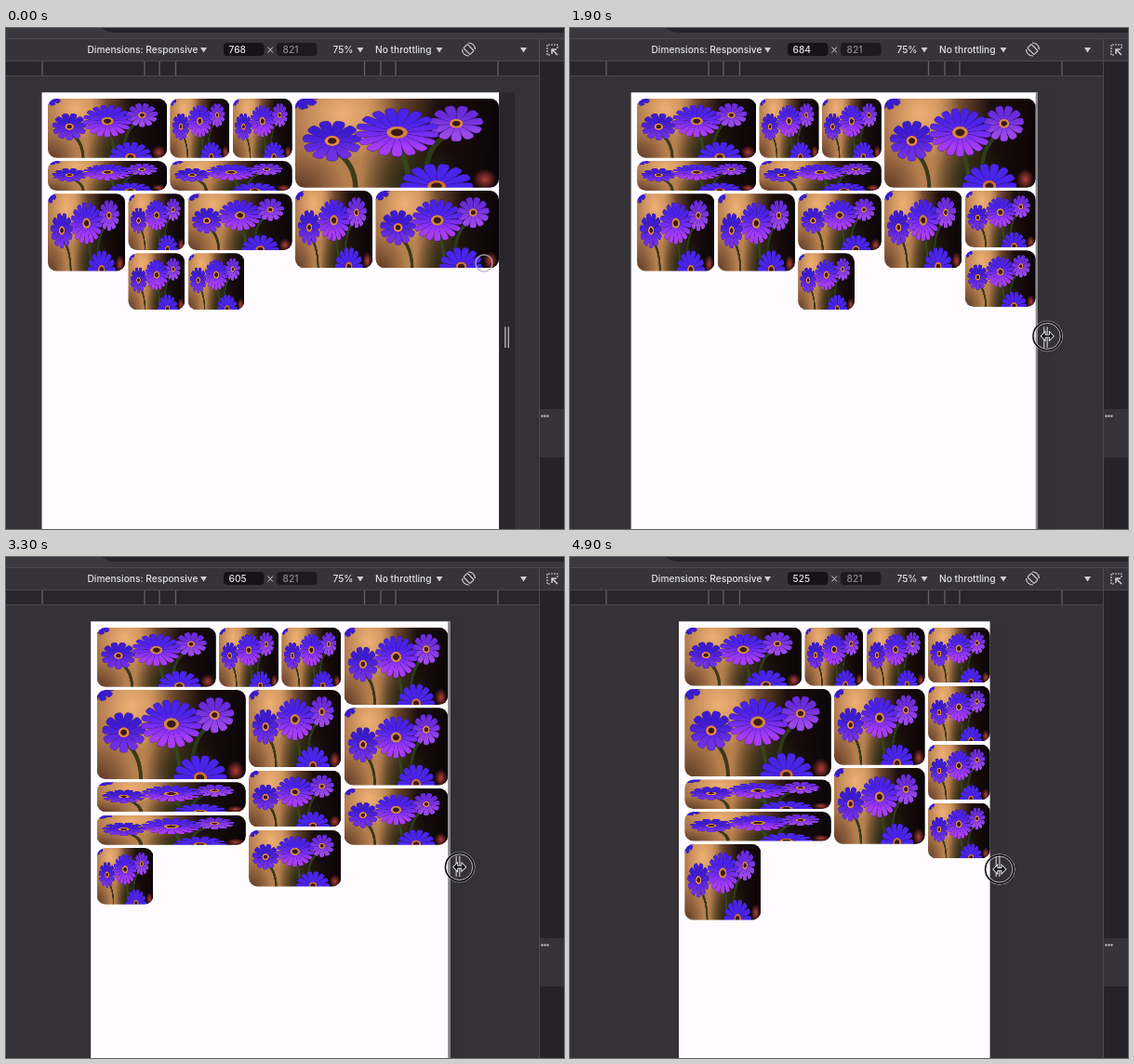
Write an HTML page with a canvas that moves like this. It is 600x539 px and loops after 5 s.

```html
<!DOCTYPE html>
<html lang="en">
<head>
<meta charset="utf-8">
<title>Responsive gallery</title>
<style>
  html, body { margin: 0; width: 100%; height: 100%; overflow: hidden; background: #343236; }
  canvas, svg { position: absolute; left: 0; top: 0; }
  text { font: 500 10.2px Inter, sans-serif; fill: #e4e2e6; }
</style>
</head>
<body>
<canvas id="stage" width="600" height="539"></canvas>
<svg width="600" height="539">
  <defs><path id="arrow" d="M0 21h7l-3.500 5.500z" fill="#cfcdd1"/></defs>
  <path d="M0 0H600V11H0z" fill="#3b393d"/>
  <path d="M103 0Q108 5 118 5H600V0z" fill="#262428"/>
  <path d="M0 11H600V35H0z" fill="#363438"/>
  <path d="M0 35H573V52H0z" fill="#28262a"/>
  <path d="M574 35H600V539H574z" fill="#252327"/>
  <path d="M574 410H600V462H574z" fill="#363438"/>
  <path d="M0 11.5H600M0 35.5H600M0 51.5H573M573.5 11V539" stroke="#4b494e"/>
  <path d="M39 36v15M149 36v15M165 36v15M182.500 36v15M385.500 36v15M403 36v15M419 36v15M529 36v15" stroke="#646267" stroke-width="1.3"/>
  <rect x="234" y="16" width="43.500" height="14" rx="4" fill="#151316"/>
  <rect x="291" y="16" width="43.500" height="14" rx="4" fill="#1c1a1d"/>
  <text x="87.500" y="27">Dimensions: Responsive</text>
  <text x="239.500" y="27" id="width">768</text>
  <path d="M281.500 20.500l5.500 6M287 20.500l-5.500 6" stroke="#d0ced2"/>
  <text x="297.500" y="27" style="fill:#8c8a8f">821</text>
  <text x="351.500" y="27">75%</text>
  <text x="397" y="27">No throttling</text>
  <use href="#arrow" x="209"/><use href="#arrow" x="377.500"/><use href="#arrow" x="462.500"/><use href="#arrow" x="553"/>
  <g fill="none" stroke="#cfcdd1" stroke-width="1.2">
    <rect x="494.500" y="18" width="6" height="10" rx="1" transform="rotate(-45 497.500 23)"/>
    <path d="M497 16a7 7 0 0 1 7.500 7M498 30a7 7 0 0 1-7.500-7"/>
    <path d="M593 22V18H582V29H586" stroke-dasharray="2 1"/>
    <path d="M593 29L587 23M587 28V23H592" stroke-width="1.500"/>
  </g>
  <path d="M575.500 417.500h8" stroke="#cfcdd1" stroke-width="2" stroke-dasharray="2 1"/>
</svg>
<script>
const LOOP = 5000, STEP = 100;
const CENTER = 284.3, TOP = 69.3, ZOOM = 0.641;
const PAD = 10, GAP = 5, MIN_LAYOUT = 531;
const ctx = document.getElementById('stage').getContext('2d');
const widthLabel = document.getElementById('width');

// [time, viewport width]
const drag = [[0, 768], [900, 768], [1400, 702], [2000, 680], [2300, 654], [3300, 605], [3900, 580], [4900, 525]];

// [width, height, count] in order of placement
const tileSizes = [[200, 100, 1], [100, 100, 2], [250, 150, 1], [200, 50, 2], [130, 130, 3], [95, 95, 4]]
  .flatMap(([w, h, count]) => Array(count).fill({ w, h }));

function track(keys, t) {
  const i = keys.findIndex(key => key[0] > t);
  if (i < 0) return keys[keys.length - 1][1];
  const [t0, a] = keys[i - 1], [t1, b] = keys[i];
  return a + (b - a) * (t - t0) / (t1 - t0);
}

// Skyline packing: the first tile that fits goes into the highest free slot,
// and widens to fill it when nothing else fits beside it.
function pack(layoutWidth) {
  const pool = [...tileSizes], placed = [];
  let slots = [{ x: PAD, y: PAD, w: layoutWidth - PAD }];
  while (pool.length) {
    const slot = slots.reduce((best, s) => s.y < best.y ? s : best);
    const pick = pool.findIndex(tile => tile.w <= slot.w);
    if (pick < 0) break;
    let [{ w, h }] = pool.splice(pick, 1);
    const rest = slot.w - w - GAP;
    const wide = pool.length && !pool.some(tile => tile.w <= rest);
    if (wide) w = slot.w;
    placed.push({ x: slot.x, y: slot.y, w, h });
    const next = [{ x: slot.x, y: slot.y + h + GAP, w }];
    if (!wide) next.push({ x: slot.x + w + GAP, y: slot.y, w: rest });
    slots.splice(slots.indexOf(slot), 1, ...next);
    slots = slots.reduce((merged, s) => {
      const last = merged[merged.length - 1];
      if (last && last.y === s.y) last.w += GAP + s.w;
      else merged.push(s);
      return merged;
    }, []);
  }
  return placed;
}

function flower(g, x, y, rx, ry, count, upper, lower, heart) {
  const shade = g.createLinearGradient(0, y - ry, 0, y + ry);
  shade.addColorStop(0.3, upper);
  shade.addColorStop(0.8, lower);
  g.fillStyle = shade;
  g.strokeStyle = '#2a0c7890';
  g.lineWidth = 1;
  for (let i = 0; i < count; i++) {
    const angle = (i * 2 + 1) * Math.PI / count;
    const tip = (reach, turn) => [x + rx * reach * Math.sin(angle + turn), y - ry * reach * Math.cos(angle + turn)];
    const spread = 3.6 / count;
    g.beginPath();
    g.moveTo(x, y);
    g.bezierCurveTo(...tip(0.9, -spread), ...tip(1.05, -spread * 0.7), ...tip(1, 0));
    g.bezierCurveTo(...tip(1.05, spread * 0.7), ...tip(0.9, spread), x, y);
    g.fill();
    g.stroke();
  }
  for (const [r, color] of [[0.25, heart], [0.15, '#3a1a18']]) {
    g.beginPath();
    g.ellipse(x, y, rx * r, ry * r, 0, 0, 7);
    g.fillStyle = color;
    g.fill();
  }
}

function paintPhoto() {
  const photo = document.createElement('canvas');
  photo.width = 320;
  photo.height = 160;
  const g = photo.getContext('2d');
  const glow = (x, y, r, color) => {
    const fill = g.createRadialGradient(x, y, 0, x, y, r);
    fill.addColorStop(0, color);
    fill.addColorStop(1, color + '00');
    g.fillStyle = fill;
    g.fillRect(0, 0, 320, 160);
  };
  const stem = (color, x0, y0, x1, y1) => {
    g.strokeStyle = color;
    g.lineWidth = 8;
    g.beginPath();
    g.moveTo(x0, y0);
    g.quadraticCurveTo(x1, y0 + 20, x1, y1);
    g.stroke();
  };
  const back = g.createLinearGradient(0, 0, 320, 30);
  [[0, '#a8734a'], [0.35, '#b8824f'], [0.53, '#63402a'], [0.7, '#1c0f0c'], [1, '#0c0507']]
    .forEach(stop => back.addColorStop(...stop));
  g.fillStyle = back;
  g.fillRect(0, 0, 320, 160);
  glow(75, 28, 85, '#efb074');
  glow(5, 165, 75, '#5c3824');
  glow(185, 150, 80, '#222a10');
  stem('#3c3a1a', 62, 95, 95, 165);
  stem('#35461a', 165, 95, 178, 165);
  stem('#2c3a18', 240, 65, 205, 140);
  glow(298, 145, 19, '#b04038');
  flower(g, 4, -4, 34, 24, 10, '#3a1cd0', '#3a1cd0', '#3a1cd0');
  flower(g, 253, 45, 42, 32, 11, '#6a2cd8', '#9a48e8', '#e08840');
  flower(g, 58, 76, 46, 36, 11, '#3c1cd0', '#7030e4', '#f08c38');
  flower(g, 222, 157, 57, 40, 14, '#4a24e8', '#4a24e8', '#d07030');
  flower(g, 160, 61, 65, 43, 17, '#4a22e8', '#a83cf8', '#d0883c');
  return photo;
}
const photo = paintPhoto();

function drawGallery(left, contentWidth) {
  const layoutWidth = Math.max(contentWidth / ZOOM, MIN_LAYOUT);
  ctx.save();
  ctx.translate(left, TOP);
  ctx.scale(contentWidth / layoutWidth, contentWidth / layoutWidth);
  for (const { x, y, w, h } of pack(layoutWidth)) {
    ctx.save();
    ctx.beginPath();
    ctx.roundRect(x, y, w, h, 15);
    ctx.clip();
    ctx.drawImage(photo, x, y, w, h);
    ctx.restore();
  }
  ctx.restore();
}

function ring(x, y, r, color, lineWidth) {
  ctx.beginPath();
  ctx.arc(x, y, r, 0, 7);
  ctx.strokeStyle = color;
  ctx.lineWidth = lineWidth;
  ctx.stroke();
}

function drawPointer(x, y) {
  ctx.fillStyle = '#111';
  ctx.fill(new Path2D(`M${x - 4} ${y - 4}l8 5l-4 1l-2 3z`));
  ring(x, y, 9, '#b8b4bccc', 1.5);
}

function drawResizer(x, y) {
  ring(x, y, 16.3, '#d8d6da', 0.8);
  ring(x, y, 15.2, '#0c0b0d', 1.6);
  ring(x, y, 14, '#d8d6da', 0.8);
  const arrows = new Path2D(`M${x - 6.5} ${y}l4-4v3h5v-3l4 4l-4 4v-3h-5v3z`);
  ctx.strokeStyle = '#fff';
  ctx.lineWidth = 1.6;
  ctx.stroke(arrows);
  ctx.fillStyle = '#0c0b0d';
  ctx.fill(arrows);
}

function rect(color, x, y, w, h) {
  ctx.fillStyle = color;
  ctx.fillRect(x, y, w, h);
}

function draw(t) {
  const width = Math.round(track(drag, t));
  const pageWidth = width * 0.646 - 4.6;
  const left = CENTER - pageWidth / 2, right = CENTER + pageWidth / 2;
  const hovering = t >= 300;
  const lag = t > 900 && t < 4900 ? 2.2 : 0;
  widthLabel.textContent = width;
  rect('#343236', 0, 0, 600, 539);
  rect(hovering ? '#333135' : '#29272b', right, TOP, 17, 470);
  rect('#fefcfe', left, TOP, pageWidth, 470);
  drawGallery(left, pageWidth - lag);
  rect('#858387', right - lag, TOP, lag, 470);
  rect('#a9a7ab', right + 6, 321.5, 1.5, 22.5);
  rect('#a9a7ab', right + 9.5, 321.5, 1.5, 22.5);
  if (hovering) drawResizer(right + 10.3, 330 + Math.max(0, t - 900) * 0.0015);
  else if (t < 100) drawPointer(514, 253);
  else drawPointer(529, 327);
}

function frame(now) {
  draw(Math.floor(now % LOOP / STEP) * STEP);
  requestAnimationFrame(frame);
}
requestAnimationFrame(frame);
</script>
</body>
</html>
```
